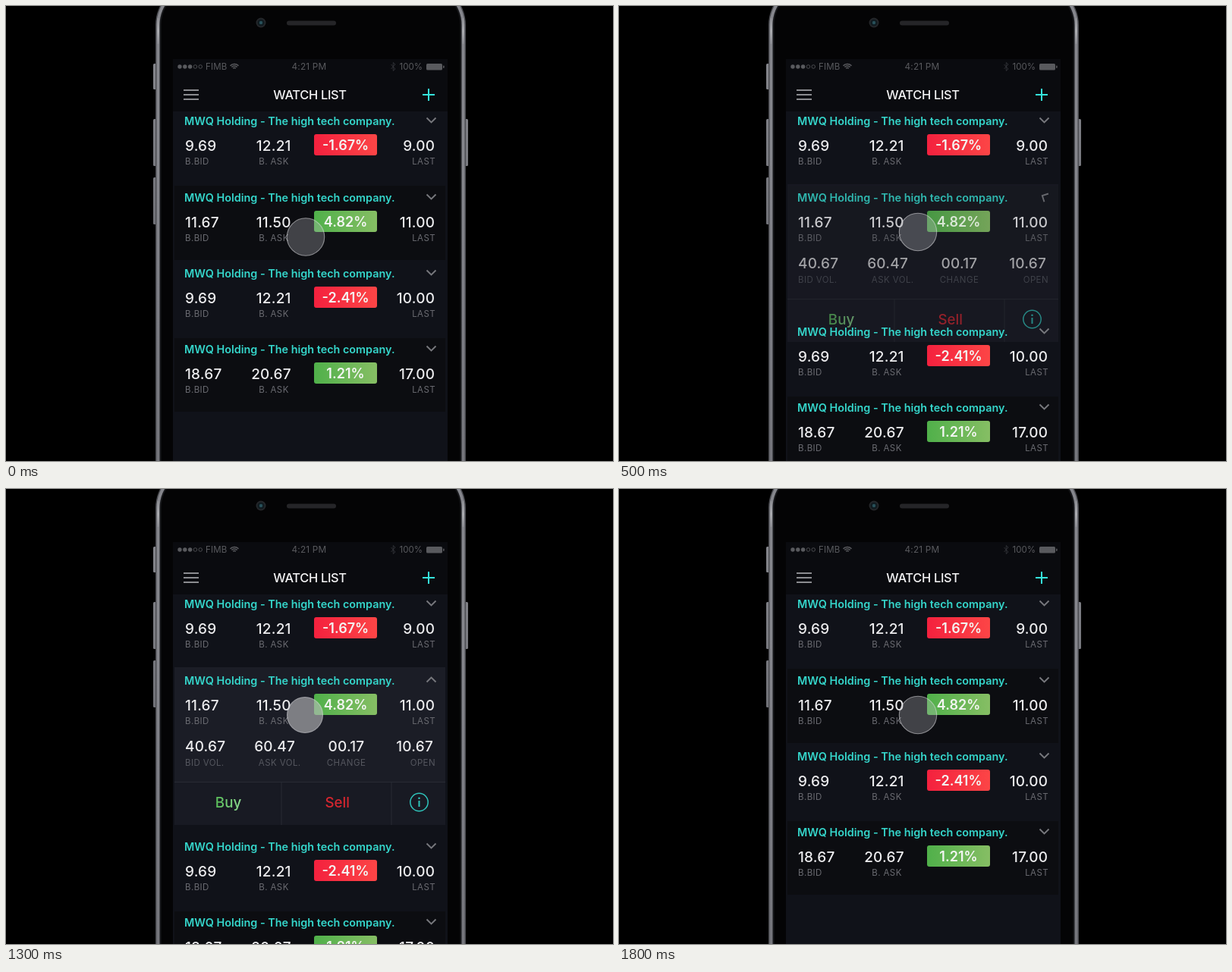
An HTML page with a canvas for the animation above (1.9 s loop, 800 by 600 pixels).

```html
<!DOCTYPE html>
<html lang="en">
<head>
<meta charset="utf-8">
<title>Watch list</title>
<style>
  html, body { margin: 0; width: 100%; height: 100%; overflow: hidden; background: #000; }
  canvas { display: block; width: 800px; height: 600px; }
</style>
</head>
<body>
<canvas id="stage" width="800" height="600"></canvas>
<script>
const ctx = document.getElementById('stage').getContext('2d');
const LOOP = 1900, STEP = 100;
const EXPAND = 119;
const TEAL = '#35d6cb', WHITE = '#ececee', GREY = '#6a6b71';
const ROWS = [
  { bid: '9.69', ask: '12.21', change: '-1.67%', last: '9.00' },
  { bid: '11.67', ask: '11.50', change: '4.82%', last: '11.00' },
  { bid: '9.69', ask: '12.21', change: '-2.41%', last: '10.00' },
  { bid: '18.67', ask: '20.67', change: '1.21%', last: '17.00' }
];

const clamp = v => Math.max(0, Math.min(1, v));
const mix = (a, b, k) => a + (b - a) * k;

// Standard "ease" curve: cubic-bezier(.25, .1, .25, 1)
function ease(x) {
  if (x <= 0) return 0;
  if (x >= 1) return 1;
  const curve = (u, a, b) => 3 * a * u * (1 - u) ** 2 + 3 * b * u * u * (1 - u) + u ** 3;
  let lo = 0, hi = 1;
  for (let i = 0; i < 20; i++) {
    const mid = (lo + hi) / 2;
    if (curve(mid, .25, .25) < x) lo = mid; else hi = mid;
  }
  return curve(lo, .1, 1);
}

function text(str, x, y, size, color, { align = 'left', weight = 400, spacing = 0 } = {}) {
  ctx.font = `${weight} ${size}px Inter, sans-serif`;
  ctx.letterSpacing = spacing + 'px';
  ctx.textAlign = align;
  ctx.fillStyle = color;
  ctx.fillText(str, x, y);
}

function box(x, y, w, h, color, r = 0) {
  ctx.beginPath();
  ctx.roundRect(x, y, w, h, r);
  ctx.fillStyle = color;
  ctx.fill();
}

function line(points, color, width) {
  ctx.beginPath();
  points.forEach(([x, y]) => ctx.lineTo(x, y));
  ctx.strokeStyle = color;
  ctx.lineWidth = width;
  ctx.stroke();
}

function disc(x, y, r, fill, stroke, width = 1) {
  ctx.beginPath();
  ctx.arc(x, y, r, 0, 7);
  if (fill) { ctx.fillStyle = fill; ctx.fill(); }
  if (stroke) { ctx.strokeStyle = stroke; ctx.lineWidth = width; ctx.stroke(); }
}

function gradient(x0, y0, x1, y1, ...colors) {
  const g = ctx.createLinearGradient(x0, y0, x1, y1);
  colors.forEach((c, i) => g.addColorStop(i / (colors.length - 1), c));
  return g;
}

function faded(alpha, paint) {
  if (alpha <= 0) return;
  ctx.save();
  ctx.globalAlpha *= alpha;
  paint();
  ctx.restore();
}

const value = (str, x, y, align) => text(str, x, y, 19, WHITE, { align, weight: 500, spacing: .2 });
const label = (str, x, y, align, color = GREY) => text(str, x, y, 11.5, color, { align, spacing: .4 });

function drawPhone() {
  box(0, 0, 800, 600, '#000');
  const button = gradient(0, 70, 0, 290, '#85868c', '#707177');
  [[194, 76, 34], [194, 149, 62], [194, 226, 62], [605, 149, 62]]
    .forEach(([x, y, h]) => box(x, y, 4, h, button, 1.5));
  box(197, -30, 409, 760, '#4a4b50', 55);
  box(198.5, -28.5, 406, 758, gradient(0, 0, 0, 600, '#85868c', '#85868c', '#7d7e85', '#75767c'), 53.5);
  box(202.5, -25, 398, 750, '#17181b', 50);
  box(204.5, -24, 394, 748, '#040405', 49);
  const shine = gradient(0, 12, 0, 54, '#85868c', '#b9babe', '#85868c');
  [200.5, 602.5].forEach(x => line([[x, 16], [x, 50]], shine, 2));

  disc(336, 22, 6.5, '#25272a');
  disc(336, 22, 4.6, '#101b20');
  disc(336, 22, 2.2, '#28505a');
  box(370, 19.5, 65, 6, '#252528', 3);
  box(220, 70, 362, 530, '#101219');
  box(220, 70, 362, 69, '#0a0b0f');
}

function drawStatus() {
  const c = '#595a5e';
  for (let i = 0; i < 5; i++) {
    const x = 229 + i * 6.8;
    if (i < 3) disc(x, 80, 2.7, c); else disc(x, 80, 2.3, null, c, .8);
  }
  text('FIMB', 263, 84, 11.5, c, { spacing: .2 });
  [2.5, 5, 7.5].forEach(r => {
    ctx.beginPath();
    ctx.arc(301, 84, r, -Math.PI * .76, -Math.PI * .24);
    ctx.strokeStyle = c;
    ctx.lineWidth = 1.5;
    ctx.stroke();
  });
  text('4:21 PM', 399.5, 84, 11.8, c, { align: 'center', spacing: .2 });
  line([[507.5, 77], [513, 83], [510.3, 85.5], [510.3, 74.5], [513, 77], [507.5, 83]], '#34353a', .9);
  text('100%', 549, 84, 11.5, c, { align: 'right' });
  box(554, 76, 21, 8.5, c, 1.5);
  box(576, 78.5, 1.6, 3.5, c, 1);
}

function drawHeader() {
  [111, 117, 123].forEach(y => line([[234, y], [254, y]], '#8b8c90', 2));
  text('WATCH LIST', 400.5, 123, 16.4, '#f4f4f5', { align: 'center', weight: 500, spacing: -.3 });
  line([[549, 117], [565, 117]], '#35e4dc', 2);
  line([[557, 109], [557, 125]], '#35e4dc', 2);
}

function drawChevron(x, y, turn) {
  ctx.save();
  ctx.translate(x, y);
  ctx.rotate(turn * Math.PI);
  line([[-6, -3], [0, 3], [6, -3]], '#77787d', 1.9);
  ctx.restore();
}

function drawRow(row, y, turn = 0) {
  text('MWQ Holding - The high tech company.', 235, y + 5.5, 14.4, TEAL, { weight: 600 });
  drawChevron(560.5, y - .5, turn);
  value(row.bid, 236, y + 39.5);
  value(row.ask, 375.7, y + 39.5, 'right');
  value(row.last, 565.2, y + 39.5, 'right');
  label('B.BID', 236, y + 58.3);
  label('B. ASK', 353, y + 58.3, 'center');
  label('LAST', 566, y + 58.3, 'right');
  const colors = row.change[0] === '-' ? ['#f4213e', '#fc4546'] : ['#50b04a', '#86be64'];
  box(406, y + 18, 83, 28, gradient(406, 0, 489, 0, ...colors), 3);
  text(row.change, 447.5, y + 38.7, 18, '#f3f5f2', { align: 'center', weight: 600 });
}

function drawPanel() {
  box(222, 235, 357, 208, '#1b1d26');
  box(222, 387, 357, 56, '#181a23');
  line([[222, 386.5], [579, 386.5]], '#282b34', 1);
  line([[363, 387], [363, 443]], '#282b34', 1);
  line([[508, 387], [508, 443]], '#282b34', 1);
}

function drawDetails() {
  value('40.67', 236, 346);
  value('60.47', 381, 346, 'right');
  value('00.17', 448.5, 346, 'center');
  value('10.67', 563, 346, 'right');
  const dim = '#55575f';
  label('BID VOL.', 236, 364.5, 'left', dim);
  label('ASK VOL.', 388.5, 364.5, 'right', dim);
  label('CHANGE', 448.5, 364.5, 'center', dim);
  label('OPEN', 566, 364.5, 'right', dim);
  text('Buy', 293, 419.5, 18.7, gradient(276, 0, 311, 0, '#58bd58', '#8fdc92'), { align: 'center', weight: 500 });
  text('Sell', 436.7, 419.5, 18.7, '#d5262f', { align: 'center', weight: 500 });
  disc(544.5, 413, 11.7, null, '#2fc4bb', 1.5);
  box(543.5, 411, 2, 8, '#2fc4bb');
  disc(544.5, 407.7, 1.3, '#2fc4bb');
}

function drawTouch(t) {
  const arrive = clamp(t / 200);
  const tap = at => clamp(1 - Math.abs(t - at) / 180);
  const press = Math.max(tap(300), tap(1300));
  disc(mix(395, 394, arrive), mix(304.5, 298, arrive), mix(24.7, 23.5, press),
    `rgba(190,190,194,${mix(.3, .6, press)})`, 'rgba(225,225,228,.55)', 1.1);
}

function draw(t) {
  const progress = start => ease((t - start) / 370);
  const open = progress(360) - progress(1360);
  const shift = Math.round(open * EXPAND);
  const rowY = i => Math.round(151.3 + 100.3 * i) + (i > 1 ? shift : 0);

  drawPhone();
  faded(1 - open, () => box(222, 237, 357, 98, '#0c0d11'));
  faded(open, drawPanel);
  box(222, 438 + shift, 357, 97, '#0c0d11');
  drawStatus();
  drawHeader();
  faded(open, drawDetails);
  // The second row cross-fades between its two states and dips midway.
  ROWS.forEach((row, i) => faded(i === 1 ? 1 - .7 * open * (1 - open) : 1,
    () => drawRow(row, rowY(i), i === 1 ? open : 0)));
  drawTouch(t);
}

function tick(now) {
  draw(Math.floor((now % LOOP) / STEP) * STEP);
  requestAnimationFrame(tick);
}
draw(0);
requestAnimationFrame(tick);
</script>
</body>
</html>
```
